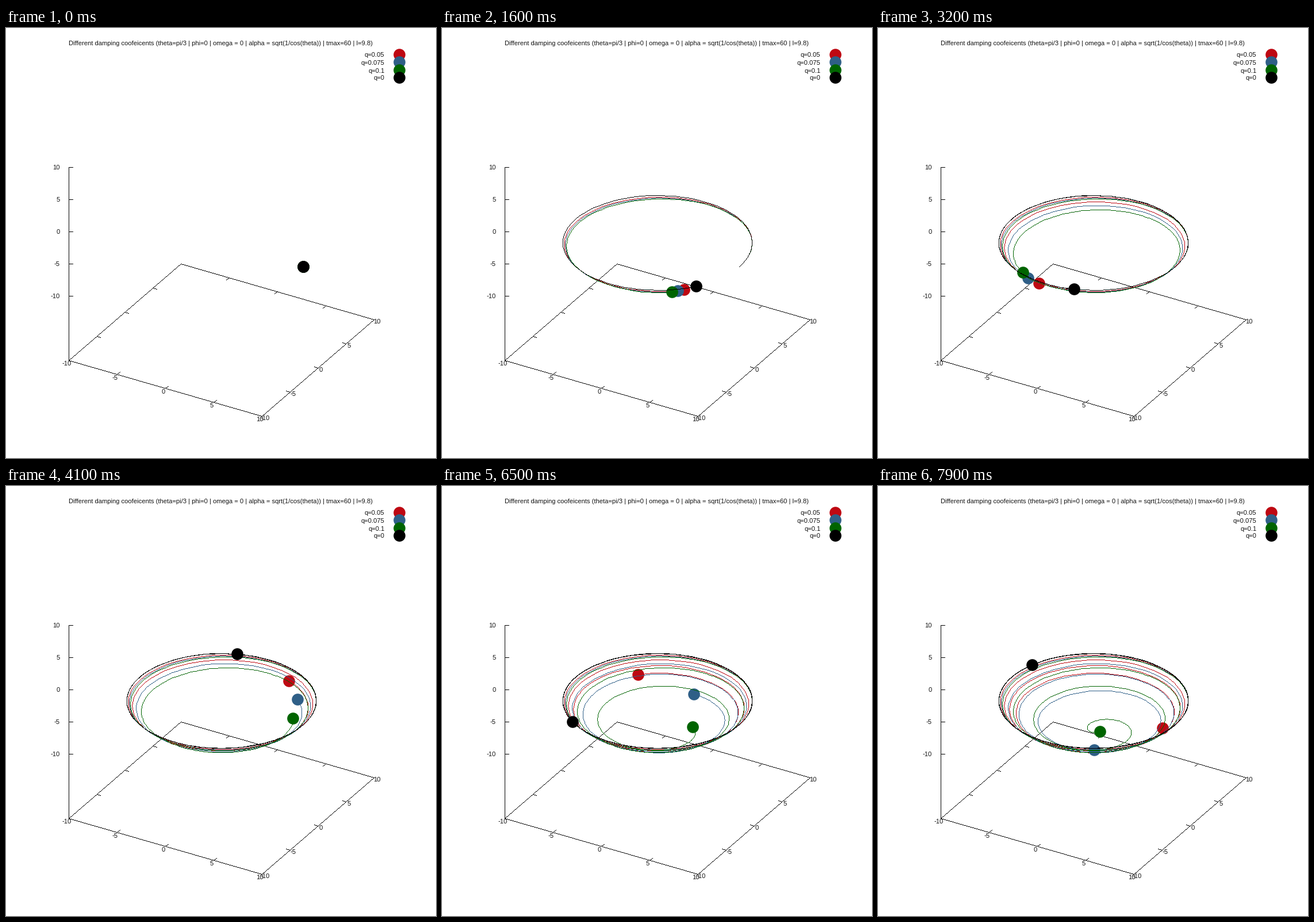
These frames come from a looping animation (748x748 px, 8 s). A matplotlib script:

```python
import numpy as np
import matplotlib.pyplot as plt
from matplotlib.animation import FuncAnimation
from matplotlib.patches import Circle

SIZE, DPI = 748, 100
FRAMES, INTERVAL = 80, 100
DT_FRAME, SUB = 0.25, 5
LENGTH = 9.8

SERIES = [
    (0.05, "#be0812"),
    (0.075, "#2f5f87"),
    (0.1, "#006400"),
    (0, "#000000"),
]

plt.rcParams["font.family"] = "Liberation Sans"
plt.rcParams["font.size"] = 8
plt.rcParams["text.hinting"] = "native"


def project(x, y, z):
    """View rotated by 60 and 30 degrees, in stage pixels."""
    return 374.5 + 16.8 * x + 9.72 * y, 318.5 + 4.85 * x - 8.4 * y - 11.2 * z


def simulate(q):
    """Damped pendulum on a sphere, all damping values at once (RK4)."""
    def rate(s):
        theta, omega, _, alpha = s
        sin, cos = np.sin(theta), np.cos(theta)
        return np.array([
            omega,
            sin * cos * alpha**2 - sin - q * omega,
            alpha,
            -2 * omega * alpha * sin / cos - q * alpha,
        ])

    h = DT_FRAME / SUB
    start = [np.pi / 3, 0, 0, np.sqrt(1 / np.cos(np.pi / 3))]
    s = np.outer(start, np.ones(len(q)))
    states = [s]
    for _ in range((FRAMES - 1) * SUB):
        k1 = rate(s)
        k2 = rate(s + h / 2 * k1)
        k3 = rate(s + h / 2 * k2)
        k4 = rate(s + h * k3)
        s = s + h / 6 * (k1 + 2 * k2 + 2 * k3 + k4)
        states.append(s)
    theta, _, phi, _ = np.array(states).transpose(1, 0, 2)
    r = LENGTH * np.sin(theta)
    return project(r * np.cos(phi), r * np.sin(phi), -LENGTH * np.cos(theta))


def raster(xs, ys):
    """Whole pixels along a polyline, and how many are used up to each vertex."""
    pts = np.rint(np.column_stack([xs, ys]))
    parts, ends = [pts[:1]], [1]
    for a, b in zip(pts[:-1], pts[1:]):
        n = int(np.abs(b - a).max())
        t = np.arange(1, n + 1)[:, None] / max(n, 1)
        parts.append(np.rint(a + (b - a) * t))
        ends.append(ends[-1] + n)
    return np.concatenate(parts), ends


fig = plt.figure(figsize=(SIZE / DPI, SIZE / DPI), dpi=DPI, facecolor="white")
ax = fig.add_axes([0, 0, 1, 1])
ax.set_xlim(-0.5, SIZE - 0.5)
ax.set_ylim(SIZE - 0.5, -0.5)
ax.axis("off")


def set_pixels(line, pts):
    # a quarter pixel off centre keeps marker snapping unambiguous
    line.set_data(pts[:, 0] - 0.25, pts[:, 1] + 0.25)


def pixel_line(color="black", z=1):
    return ax.plot([], [], ",", color=color, zorder=z)[0]


def stroke(xs, ys):
    set_pixels(pixel_line(), raster(xs, ys)[0])


def label(x, y, text, ha="center"):
    ax.text(x, y + 4, text, ha=ha, va="baseline", color="#111111", zorder=1)


def ball(x, y, color, z):
    return ax.add_patch(Circle((x, y), 10.3, fc=color, lw=0, zorder=z))


def draw_axes():
    floor = -20
    corners = [(-10, -10), (10, -10), (10, 10), (-10, 10), (-10, -10)]
    stroke(*zip(*[project(x, y, floor) for x, y in corners]))
    stroke([109, 109], [242, 578])
    for v in range(-10, 11, 5):
        zy = 354 - 11.2 * v
        stroke([109, 116], [zy, zy])
        label(93, zy, str(v), "right")
        fx, fy = project(v, -10, floor)
        label(fx - 4, fy + 5, str(v))
        rx, ry = project(10, v, floor)
        label(rx + 5, ry + 3, str(v))
        if abs(v) < 10:
            bx, by = project(v, 10, floor)
            lx, ly = project(-10, v, floor)
            stroke([fx, fx + 4.4], [fy, fy - 3.8])
            stroke([bx, bx - 4.4], [by, by + 3.8])
            stroke([rx, rx - 6.5], [ry, ry - 1.9])
            stroke([lx, lx + 6.5], [ly, ly + 1.9])


draw_axes()
label(373, 26, "Different damping coofeicents (theta=pi/3 | phi=0 | omega = 0 | "
               "alpha = sqrt(1/cos(theta)) | tmax=60 | l=9.8)")

path_x, path_y = simulate(np.array([q for q, _ in SERIES]))
trails, balls, tracks = [], [], []
for i, (q, color) in enumerate(SERIES):
    key_y = round(46 + 13.3 * i)
    label(658, key_y, f"q={q}", "right")
    ball(684, key_y, color, 2 + i)
    tracks.append(raster(path_x[:, i], path_y[:, i]))
    trails.append(pixel_line(color, 10 + 2 * i))
    balls.append(ball(0, 0, color, 11 + 2 * i))


def update(frame):
    for trail, dot, (pts, ends) in zip(trails, balls, tracks):
        count = ends[frame * SUB]
        set_pixels(trail, pts[:count])
        dot.center = pts[count - 1]
    return trails + balls


anim = FuncAnimation(fig, update, frames=FRAMES, interval=INTERVAL,
                     repeat=True, repeat_delay=0)
plt.show()
```
